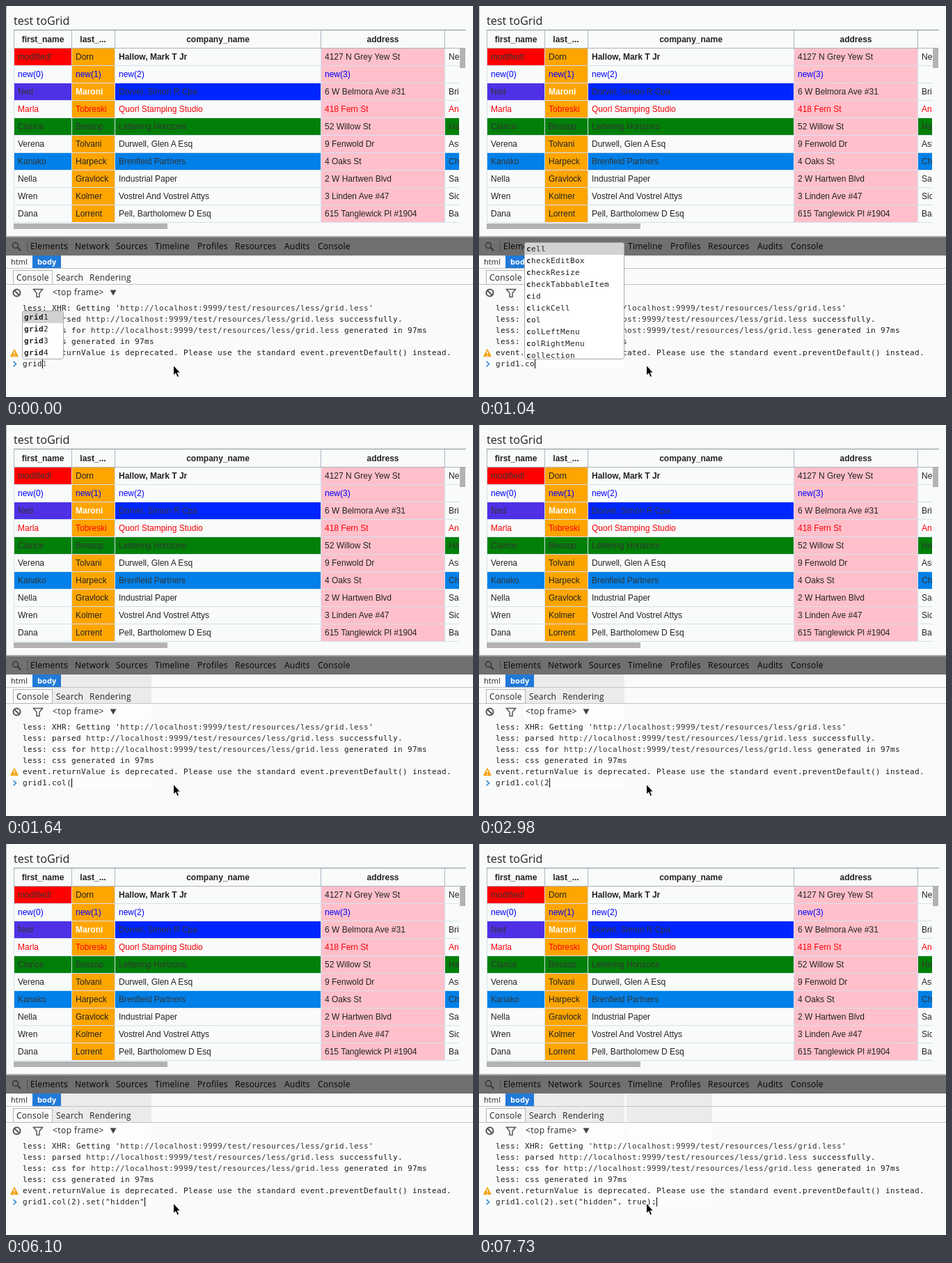
An HTML page for the animation above (8 s loop, 671x561 px).

```html
<!DOCTYPE html>
<html lang="en">
<head>
<meta charset="utf-8">
<title>Grid console</title>
<style>
  html, body { margin: 0; width: 100%; height: 100%; overflow: hidden; background: #f9fbfa; }
  svg { display: block; width: 671px; height: 561px; }
  text { white-space: pre; }
  .cell { font: 12px "Liberation Sans", Arial, sans-serif; }
  .ui { font: 12px "Open Sans", sans-serif; letter-spacing: .25px; }
  .crumb { font: 11px "Open Sans", sans-serif; letter-spacing: .1px; }
  .title { font: 16.2px "Open Sans", sans-serif; }
  .mono { font: 11px "DejaVu Sans Mono", monospace; letter-spacing: .378px; }
  .bold { font-weight: bold; }
  .mid { text-anchor: middle; }
</style>
</head>
<body>
<svg id="stage" viewBox="0 0 671 561" xmlns="http://www.w3.org/2000/svg"></svg>
<script>
const LOOP = 8000, CHAR = 7, TEXT_X = 24;
const stage = document.getElementById('stage');

function add(tag, attrs, parent = stage, content) {
  const el = document.createElementNS('http://www.w3.org/2000/svg', tag);
  for (const k in attrs) el.setAttribute(k, attrs[k]);
  if (content !== undefined) el.textContent = content;
  parent.appendChild(el);
  return el;
}
const rect = (x, y, width, height, fill, parent) => add('rect', { x, y, width, height, fill }, parent);
const label = (x, y, cls, str, fill = '#222', parent) => add('text', { x, y, class: cls, fill }, parent, str);
const path = (d, attrs, parent) => add('path', { d, fill: 'none', ...attrs }, parent);

// Table
const COLS = [11, 95, 156, 452, 630, 651];
const RED = '#fa0008', BLUE = '#0000ff', GREEN = '#008008', SKY = '#0080e8';
const ROWS = [
  { cells: ['modified!', 'Dorn', 'Hallow, Mark T Jr', '4127 N Grey Yew St', 'Ne'], fills: { 0: '#ff0000' }, bold: 2 },
  { cells: ['new(0)', 'new(1)', 'new(2)', 'new(3)', ''], ink: BLUE },
  { cells: ['Ned', 'Maroni', 'Dorvel, Simon R Cpa', '6 W Belmora Ave #31', 'Bri'], fills: { 0: '#5030e6', 2: '#0026ff' }, bold: 1 },
  { cells: ['Marla', 'Tobreski', 'Quorl Stamping Studio', '418 Fern St', 'An'], ink: RED },
  { cells: ['Clarice', 'Bessop', 'Lettering Horizons', '52 Willow St', 'Ha'], fills: { 0: GREEN, 1: GREEN, 2: GREEN, 4: GREEN } },
  { cells: ['Verena', 'Tolvani', 'Durwell, Glen A Esq', '9 Fenwold Dr', 'Asi'] },
  { cells: ['Kanako', 'Harpeck', 'Brenfield Partners', '4 Oaks St', 'Ch'], fills: { 0: SKY, 2: SKY, 4: SKY } },
  { cells: ['Nella', 'Gravlock', 'Industrial Paper', '2 W Hartwen Blvd', 'Sa'] },
  { cells: ['Wren', 'Kolmer', 'Vostrel And Vostrel Attys', '3 Linden Ave #47', 'Sic'] },
  { cells: ['Dana', 'Lorrent', 'Pell, Bartholomew D Esq', '615 Tanglewick Pl #1904', 'Bal'] }
];

function drawTable() {
  rect(0, 0, 1, 330, '#b8b8b8');
  label(11, 27, 'title', 'test toGrid');
  const clip = add('clipPath', { id: 'body' });
  rect(11, 34, 640, 277, '#000', clip);
  const g = add('g', { 'clip-path': 'url(#body)' });
  rect(95, 61, 61, 250, '#ffa500', g);
  rect(453, 61, 177, 250, '#ffc0cb', g);
  ROWS.forEach(({ cells, fills = {}, ink = '#222', bold }, r) => {
    const y = 61 + r * 25;
    cells.forEach((str, c) => {
      const left = c === 1 ? 95 : COLS[c] + 1;
      if (fills[c]) rect(left, y, COLS[c + 1] - left, 24, fills[c], g);
      const white = bold === 1 && c === 1;
      const color = white ? '#fff' : fills[c] ? '#333' : ink;
      label(left + 5, y + 16, c === bold ? 'cell bold' : 'cell', str, color, g);
    });
    rect(11, y + 24, 640, 1, '#d3e1ed', g);
  });
  [11, 94, 156, 452, 630].forEach(x => {
    rect(x, 61, 1, 250, '#d3e1ed', g);
    rect(x, 34, 1, 26, '#a9b7c2');
  });
  rect(11, 34, 650, 1, '#84929c');
  rect(11, 60, 650, 1, '#a9b3bb');
  [[53, 'first_name'], [125, 'last_...'], [304.5, 'company_name'], [541.5, 'address']]
    .forEach(([x, str]) => label(x, 52, 'cell bold mid', str));
  rect(652, 61, 8, 28, '#b3b3b3');
  rect(11, 312, 221, 8, '#b3b3b3');
}

// Area repainted in a slightly different shade once a popup has closed
function makeStain(x, width) {
  const g = add('g', {});
  rect(x, 358, width, 42, '#ebebeb', g);
  rect(x, 400, width, 120, '#fdfdfd', g);
  return g;
}

function drawPanel() {
  rect(0, 330, 671, 2, '#a8a8a8');
  rect(0, 332, 671, 26, '#707070');
  rect(31, 333, 57, 24, '#6d6d6d');
  rect(30, 338, 1, 14, '#505050');
  rect(88, 338, 1, 14, '#5c5c5c');
  add('circle', { cx: 13.5, cy: 343.5, r: 4, fill: 'none', stroke: '#333', 'stroke-width': 1.5 });
  path('M16.5 346.5L21 351', { stroke: '#333', 'stroke-width': 2 });
  [[35, 'Elements'], [99, 'Network'], [158, 'Sources'], [214, 'Timeline'], [275, 'Profiles'],
    [329, 'Resources'], [400, 'Audits'], [448, 'Console']].forEach(([x, str]) => label(x, 349, 'ui', str, '#000'));

  rect(38, 358, 41, 18, '#2179d8');
  label(7, 371, 'crumb', 'html');
  label(45, 371, 'crumb bold', 'body', '#fff');
  rect(0, 376, 671, 1, '#c4c4c4');
  rect(0, 399, 671, 1, '#c4c4c4');
  add('rect', { x: 10.5, y: 379.5, width: 56, height: 20, fill: '#fafafa', stroke: '#b4b4b4' });
  [[15, 'Console'], [72, 'Search'], [120, 'Rendering']].forEach(([x, str]) => label(x, 394, 'ui', str));

  add('circle', { cx: 15.5, cy: 411.5, r: 5, fill: 'none', stroke: '#555', 'stroke-width': 2 });
  path('M12 408L19 415', { stroke: '#555', 'stroke-width': 2 });
  path('M39.5 406.5H52.5L48 412V417.5H44V412Z', { stroke: '#555', 'stroke-width': 1.5 });
  label(67, 415, 'ui', '<top frame>').style.letterSpacing = '.45px';
  path('M149.5 407.5H158.5L154 415.5Z', { fill: '#444' });

  const url = 'http://localhost:9999/test/resources/less/grid.less';
  [`less: XHR: Getting '|${url}|'`, `less: parsed |${url}| successfully.`,
    `less: css for |${url}| generated in 97ms`, 'less: css generated in 97ms',
    'event.returnValue is deprecated. Please use the standard event.preventDefault() instead.'
  ].forEach((line, i) => {
    const t = label(TEXT_X, 437 + i * 16, 'mono', '');
    line.split('|').forEach((part, j) => add('tspan', { fill: j === 1 ? '#333' : '#1a1a1a' }, t, part));
  });
  path('M12 493L17 502.5H7Z', { fill: '#f5a313', stroke: '#f5a313', 'stroke-width': 1.5, 'stroke-linejoin': 'round' });
  path('M12 495.5V499M12 500.5V502', { stroke: '#fff', 'stroke-width': 1.5 });
  path('M10.5 510L14.5 513.8L10.5 517.5', { stroke: '#2f88d8', 'stroke-width': 1.6 });
}

function makePopup(x, y, width, prefix, items) {
  const g = add('g', {}), bottom = 506.5, id = 'pop' + x + y;
  const shape = `M${x + .5} ${y + 3.5}q0 -3 3 -3H${x + width - 3.5}q3 0 3 3V${bottom - 3}q0 3 -3 3H${x + 3.5}q-3 0 -3 -3Z`;
  const clip = add('clipPath', { id }, g);
  path(shape, {}, clip);
  path(shape, { fill: '#fff' }, g);
  const list = add('g', { 'clip-path': `url(#${id})` }, g);
  rect(x, y, width, 18, '#d2d2d2', list);
  items.split(' ').forEach((item, i) => {
    const t = label(x + 3, y + 13 + i * 17, 'mono', '', '#222', list);
    add('tspan', { class: 'bold' }, t, prefix);
    add('tspan', {}, t, item.slice(prefix.length));
  });
  path(shape, { stroke: '#a8a8a8' }, g);
  return g;
}

const stains = [makeStain(65, 144), makeStain(212, 123)];
drawTable();
drawPanel();

const input = label(TEXT_X, 517, 'mono', '');
const typed = add('tspan', {}, input), hint = add('tspan', { fill: '#808080' }, input);
const caret = rect(0, 507, 1, 13, '#000');

const popups = [
  { from: 0, to: 300, el: makePopup(23, 437, 60, 'grid', 'grid1 grid2 grid3 grid4') },
  { from: 1040, to: 1340, el: makePopup(65, 339, 144, 'c',
    'cell checkEditBox checkResize checkTabbableItem cid clickCell col colLeftMenu colRightMenu collection') },
  { from: 1340, to: 1640, el: makePopup(65, 420, 109, 'col', 'col colLeftMenu colRightMenu collection columns') },
  { from: 6990, to: 7290, el: makePopup(212, 339, 123, 't',
    'table test this throw throws toLocaleString toString toolbar top tree') }
];

path('M240.5 515.5V530L243.8 527L246 532.5L248.6 531.4L246.3 526.2H250.5Z', { fill: '#000', stroke: '#fff', 'stroke-width': 1 });

// Time at which the command reaches each length
const COMMAND = 'grid1.col(2).set("hidden", true);';
const KEYS = [[0, 4], [150, 5], [750, 6], [1040, 8], [1190, 9], [1640, 10], [2980, 11], [3280, 12], [3570, 13],
  [4020, 14], [4170, 15], [4310, 16], [4460, 17], [4910, 18], [5060, 19], [5210, 20], [5350, 21], [5500, 22],
  [5650, 23], [5800, 24], [6100, 25], [6250, 26], [6700, 27], [6990, 28], [7140, 30], [7290, 31], [7590, 32], [7730, 33]];
const HINTS = [[0, 150, '1'], [6990, 7140, 'able'], [7140, 7290, 'e']];
const show = (el, on) => el.setAttribute('visibility', on ? 'visible' : 'hidden');

function render(t) {
  let count = 0;
  for (const [time, length] of KEYS) if (t >= time) count = length;
  typed.textContent = COMMAND.slice(0, count);
  const active = HINTS.find(([from, to]) => t >= from && t < to);
  hint.textContent = active ? active[2] : '';
  caret.setAttribute('x', TEXT_X + count * CHAR);
  show(caret, t < 2230 || t >= 2680);
  popups.forEach(p => show(p.el, t >= p.from && t < p.to));
  show(stains[0], t >= 1040);
  show(stains[1], t >= 6990);
}

const start = performance.now();
function tick() {
  render((performance.now() - start) % LOOP);
  requestAnimationFrame(tick);
}
render(0);
requestAnimationFrame(tick);
</script>
</body>
</html>
```
